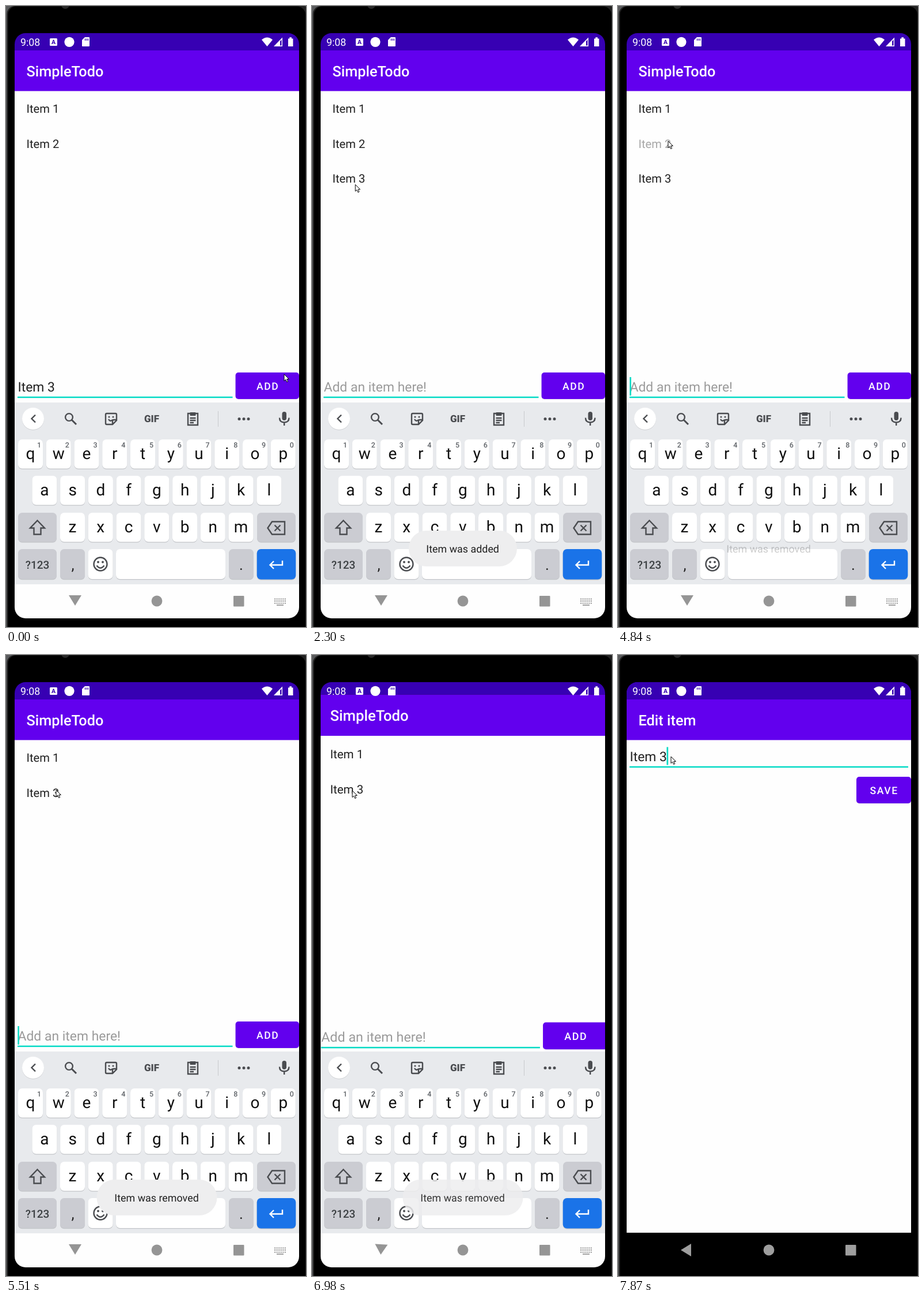
Write an HTML page that moves like this. It is 521x1076 px and loops after 8000 ms.

```html
<!DOCTYPE html>
<html lang="en">
<head>
<meta charset="utf-8">
<title>Todo list</title>
<style>
html, body { margin: 0; width: 100%; height: 100%; overflow: hidden; background: #000; }
svg { display: block; width: 521px; height: 1076px; font-family: Roboto, sans-serif; text-rendering: geometricPrecision; }
.ic { fill: none; stroke: #4a4c50; stroke-width: 2.4; }
.mid { text-anchor: middle; }
.btn { font-size: 17.6px; font-weight: 500; letter-spacing: 1.57px; fill: #fff; }
</style>
</head>
<body>
<svg id="stage" viewBox="0 0 521 1076" xmlns="http://www.w3.org/2000/svg"></svg>
<script>
const LOOP = 8000;
const INK = '#212121', PURPLE = '#6200ee', DARK = '#3700b3', TEAL = '#03dac5', ICON = '#4a4c50';

const rect = (x, y, w, h, fill, r = 0, more = '') =>
  `<rect x="${x}" y="${y}" width="${w}" height="${h}" rx="${r}" fill="${fill}" ${more}/>`;
const text = (s, x, y, size, fill = INK, more = '') =>
  `<text x="${x}" y="${y}" font-size="${size}" fill="${fill}" ${more}>${s}</text>`;
const path = (d, more = 'class="ic"') => `<path d="${d}" ${more}/>`;
const dot = (x, y, r, fill, more = '') => `<circle cx="${x}" cy="${y}" r="${r}" fill="${fill}" ${more}/>`;
const group = (id, body, more = '') => `<g id="${id}" ${more}>${body}</g>`;
const fill = c => `fill="${c}"`;

// One app screen: status strip, title bar, white body, black navigation area
const page = title =>
  rect(15, 147, 494, 854, '#fefefe') + rect(15, 77, 494, 70.4, PURPLE) + rect(15, 47, 494, 30, DARK) +
  text(title, 35.5, 122, 25.3, '#fff', 'font-weight="500"') +
  rect(15, 1001, 494, 60, '#000');

const button = (label, x, y, w, tx) =>
  rect(x, y + 0.8, w, 46, '#e4e0ea', 5) + rect(x, y, w, 46, PURPLE, 5) +
  `<text class="btn" x="${tx}" y="${y + 30}">${label}</text>`;

const key = (x, y, w, color = '#fff', h = 50.5) =>
  rect(x, y + 1.2, w, h, '#c3c5c9', 7) + rect(x, y, w, h, color, 7);

function keyRow(letters, x, y, digits = '') {
  return [...letters].map((c, i) => {
    const kx = x + i * 48.75;
    return key(kx, y, 43) + text(c, kx + 21.5, y + 34, 28, '#101010', 'class="mid"') +
      (digits ? text(digits[i], kx + 36.5, y + 14, 12.5, '#5f6368', 'class="mid" font-weight="500"') : '');
  }).join('');
}

function toolbar() {
  return dot(47, 716, 19, '#cfd1d4') + dot(47, 715, 19, '#fff') +
    path('M51 708.5L44.5 715L51 721.5') +
    `<circle cx="109.5" cy="712.5" r="6.4" class="ic"/>` + path('M114 717L122 725', 'class="ic" style="stroke-width:3"') +
    path('M175 706H190Q192 706 192 708V718L185 725H175Q173 725 173 723V708Q173 706 175 706ZM192 717H187Q185 717 185 719V725M178 716Q181 721 185 717') +
    dot(179, 712, 1.5, ICON) + dot(186, 712, 1.5, ICON) +
    text('GIF', 253, 721, 17, ICON, 'class="mid" font-weight="900"') +
    path('M316 706H333V726H316ZM319.5 714H329.5M319.5 718H329.5M319.5 722H326') +
    rect(319.5, 704, 10, 6, ICON, 1) +
    rect(368, 702, 1, 27, '#c8cacd') +
    [405, 413, 421].map(x => dot(x, 715.5, 2.5, ICON)).join('') +
    rect(479.5, 703, 7.5, 15, ICON, 3.7) + path('M475 713.5Q475 721.5 483.2 721.5Q491.5 721.5 491.5 713.5M483.2 721V727');
}

function keyboard() {
  const grey = '#cbccd2';
  return rect(15, 687, 494, 315, '#e8eaed') + rect(15, 1002, 494, 60, '#fefefe') + toolbar() +
    keyRow('qwertyuiop', 21, 751, '1234567890') +
    keyRow('asdfghjkl', 45.4, 814) +
    key(21, 878, 67, grey) + keyRow('zxcvbnm', 94, 878) + key(436, 878, 67, grey) +
    path('M54.5 891.5L67 904.5H60.5V915.5H48.5V904.5H42Z') +
    path('M454.5 904.5L462 893.5H484V915.5H462ZM466.5 899.5L476.5 909.5M476.5 899.5L466.5 909.5') +
    key(21, 941, 67, grey, 52) + key(94, 941, 43, grey, 52) + key(142.5, 941, 43, '#fff', 52) +
    key(191, 941, 190, '#fff', 52) + key(387, 941, 43, grey, 52) + key(435.7, 941, 67.6, '#1a73e8', 52.5) +
    text('?123', 54.5, 974.5, 19, '#3c4043', 'class="mid" font-weight="500"') +
    text(',', 116, 977, 26, INK, 'class="mid"') + text('.', 408.5, 977, 26, INK, 'class="mid"') +
    `<circle cx="164" cy="967" r="11.5" class="ic"/>` + dot(160, 963.5, 1.9, ICON) + dot(168, 963.5, 1.9, ICON) +
    path('M157.5 969.5Q164 978 170.5 969.5') +
    path('M480 961V968.5H459M465 962L458.5 968.5L465 975', 'fill="none" stroke="#fff" stroke-width="2.4"');
}

function statusIcons() {
  return text('9:08', 25, 69, 17.8, '#fff') +
    rect(76, 56, 13, 13, '#fff', 1.5) + text('A', 82.5, 66.3, 10.5, DARK, 'class="mid" font-weight="700"') +
    dot(110, 62.3, 8.6, '#fff') +
    path('M137 54H144Q145 54 145 55V69Q145 70 144 70H133Q132 70 132 69V59Z', fill('#fff')) +
    path('M137.5 56.5V60M140 56.5V60M142.5 56.5V60', `stroke="${DARK}" stroke-width="1.2"`) +
    path('M444 58.5Q453.5 50.5 463 58.5L453.5 70Z', fill('#fff')) +
    path('M465 70L480 54.5V70ZM476 61V68.6H478.6V58.4Z', 'fill="#fff" fill-rule="evenodd"') +
    path('M490 56.5H492.3V54.3H496V56.5H498.5V70H490Z', fill('#fff'));
}

const toast = (id, label, x, w, tx) =>
  rect(x, 909, w, 62, '#eeeeef', 31, `id="${id}Bubble"`) +
  text(label, tx, 947, 17.9, '#1f1f1f', `id="${id}Text"`);

const screen =
  group('list', page('SimpleTodo') +
    text('Item 1', 35.5, 185.3, 20.2) +
    text('Item 2', 35.5, 245.7, 20.2, INK, 'id="item2"') +
    text('Item 3', 35.5, 306, 20.2, INK, 'id="item3"') +
    group('field',
      text('Item 3', 20.5, 668, 22.9, INK, 'id="typed"') +
      text('Add an item here!', 20.5, 668, 22.9, '#9a9a9a', 'id="hint"') +
      rect(20, 676.7, 373.5, 2.5, TEAL) +
      rect(20.3, 643, 2.6, 32, TEAL, 0, 'id="caret"') +
      button('ADD', 398.6, 635, 110.4, 435) +
      `<g clip-path="url(#addClip)">${dot(483, 640, 10, '#fff', 'id="ripple"')}</g>`)) +
  group('keys', keyboard()) +
  group('edit', page('Edit item') +
    text('Item 3', 20.5, 184, 22.9) +
    rect(20, 192.8, 484, 1.4, '#868686', 0, 'id="idleLine"') +
    group('focus', rect(20, 192.7, 484, 2.5, TEAL) + rect(84.5, 159.5, 2.7, 31, TEAL)) +
    button('SAVE', 414, 211, 95, 437.5)) +
  statusIcons() +
  group('nav',
    path('M-11 -8.5H11L0 9.5Z', 'id="back"') +
    '<circle cx="262" cy="1031" r="9.4"/><rect x="395" y="1022" width="18.5" height="18.5" rx="1"/>') +
  group('imeIcon', [0, 1, 2].map(r => path(`M466 ${1027.5 + r * 3.6}H486`,
    'stroke="#999" stroke-width="2" stroke-dasharray="2.2 1.35"')).join('') + rect(470, 1037.2, 12, 1.8, '#999'));

document.getElementById('stage').innerHTML =
  `<defs><clipPath id="screenClip">${rect(15, 47, 494, 1014, '#000', 19)}</clipPath>
   <clipPath id="addClip">${rect(398.6, 635, 110.4, 46, '#000', 5)}</clipPath></defs>` +
  rect(0, 0, 521, 1076, '#5a5b5d') + rect(1.5, 0, 530, 1090, '#222', 14) + rect(3.5, 0.8, 516.5, 1090, '#000', 14) +
  dot(103, -2, 7, '#292929') +
  `<g clip-path="url(#screenClip)">${screen}</g>` +
  toast('added', 'Item was added', 168, 188, 198.3) +
  toast('removed', 'Item was removed', 157.5, 209, 188.3) +
  path('M0 0V11.6L2.7 9.2L4.7 13.5L6.7 12.6L4.8 8.4H8.4Z', 'id="cursor" fill="#fff" stroke="#000" stroke-width="1"');

const el = {};
document.querySelectorAll('#stage [id]').forEach(n => el[n.id] = n);

const seg = (t, a, b) => Math.min(1, Math.max(0, (t - a) / (b - a)));
const smooth = p => p * p * (3 - 2 * p);
const set = (n, k, v) => el[n].setAttribute(k, v);
const alpha = (n, v) => set(n, 'opacity', +v);
const pulse = (t, a, b, c, d) => seg(t, a, b) * (1 - seg(t, c, d));
const zoom = s => `translate(262 554) scale(${s}) translate(-262 -554)`;

// The bubble shows only once the label is well visible
function fadeToast(id, a) {
  alpha(id + 'Text', a);
  alpha(id + 'Bubble', seg(a, 0.4, 1));
}

// time, x, y of the pointer tip
const POINTER = [
  [0, 483, 638], [620, 483, 638], [1270, -5, 335], [1500, -5, 335], [2250, 75, 311],
  [2850, 87, 234], [5850, 87, 234], [6300, 70, 235], [7150, 70, 235], [7600, 92, 176], [LOOP, 92, 176]
];

function pointerAt(t) {
  const i = POINTER.findIndex(p => p[0] > t);
  const [t0, x0, y0] = POINTER[i - 1], [t1, x1, y1] = POINTER[i];
  const p = smooth(seg(t, t0, t1));
  return [x0 + (x1 - x0) * p, y0 + (y1 - y0) * p];
}

function render(t) {
  const submitted = t >= 300, leaving = t >= 7000, focused = t >= 7680;

  // list and input
  alpha('typed', !submitted);
  alpha('hint', submitted);
  set('caret', 'x', submitted ? 20.3 : 85);
  alpha('caret', Math.floor((t + 45) / 500) % 2 && !leaving);
  set('ripple', 'r', 10 + 110 * seg(t, 140, 420));
  alpha('ripple', 0.22 * pulse(t, 140, 220, 380, 620));
  alpha('item2', 1 - seg(t, 4765, 4890));
  alpha('item3', seg(t, 300, 430));
  set('item3', 'y', 306 - 60.3 * smooth(seg(t, 4900, 5150)));

  // opening the edit screen
  const x = seg(t, 6955, 7355);
  const open = x < 1 ? 1 - 2 ** (-10 * x) : 1;
  set('list', 'transform', zoom(1 + 0.05 * open));
  set('field', 'transform', `translate(0 ${leaving ? 314 : 0})`);
  set('edit', 'transform', zoom(0.85 + 0.15 * open));
  alpha('edit', seg(t, 7005, 7055));
  alpha('keys', !leaving);
  alpha('imeIcon', !leaving);
  alpha('idleLine', !focused);
  alpha('focus', focused);

  const turn = smooth(seg(t, 6960, 7145));
  set('back', 'transform', `translate(${120 - 1.5 * turn} ${1029.5 + 1.5 * turn}) rotate(${90 * turn})`);
  set('nav', 'fill', leaving ? '#9e9e9e' : '#959595');

  fadeToast('added', pulse(t, 1080, 1250, 3000, 3240));
  fadeToast('removed', pulse(t, 4790, 5020, 6960, 7175));

  const [px, py] = pointerAt(t);
  set('cursor', 'transform', `translate(${px} ${py})`);
}

function tick() {
  render(performance.now() % LOOP);
  requestAnimationFrame(tick);
}
render(0);
requestAnimationFrame(tick);
</script>
</body>
</html>
```
